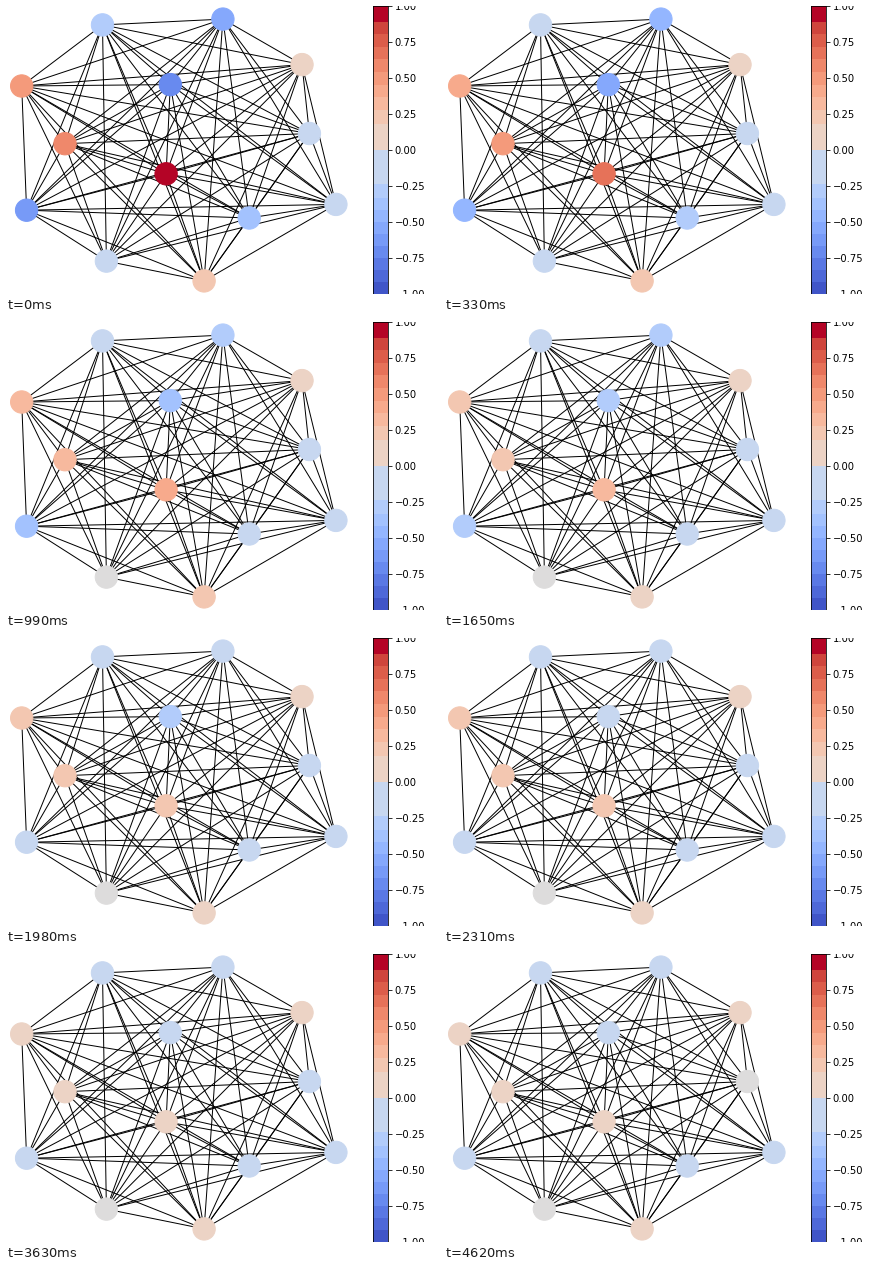
A matplotlib script for the animation above (4.95 s loop, 432 px wide and 288 px high).

```python
from itertools import combinations

import matplotlib.pyplot as plt
import numpy as np
from matplotlib.animation import FuncAnimation
from matplotlib.collections import LineCollection

W, H = 432, 288
STEPS, STEP_MS = 15, 330
DECAY = .45

# x, y and starting value of each node
NODES = np.array([
    (96.5, 18.9, -.25), (216.9, 13.1, -.55), (296, 58.6, .15),
    (15.7, 80, .51), (164.3, 78.6, -.71), (59, 137.7, .62),
    (303.4, 127.5, -.12), (160.1, 167.8, 1), (20.6, 204.2, -.64),
    (243.2, 212, -.34), (329.9, 198.4, -.2), (100.4, 255.1, -.075),
    (198.1, 274.9, .26),
])
points, start = NODES[:, :2], NODES[:, 2]

# colour bands: grey in the middle, wide pale bands, then even steps
cold = np.r_[-np.linspace(1, 1 / 3, 9), -.235]
warm = np.r_[.18, np.linspace(.28, .89, 8), 1]
edges = np.r_[cold, -.07, .07, warm]
mids = (edges[:-1] + edges[1:]) / 2
mids[-1] = 1
bands = plt.get_cmap("coolwarm")((mids + 1) / 2)
grey = len(cold)


def tones(values):
    return bands[np.digitize(values, edges[1:-1])]


def values_at(step):
    """Each value fades at a rate proportional to its square."""
    return start / (1 + DECAY * np.abs(start) * step)


fig = plt.figure(figsize=(W / 72, H / 72), dpi=72, facecolor="white")

# network: every node is linked to every other
ax = fig.add_axes([0, 0, 1, 1])
ax.set_xlim(0, W)
ax.set_ylim(H, 0)
ax.axis("off")
ax.add_collection(LineCollection(list(combinations(points, 2)),
                                 colors="black", linewidths=1, zorder=1))
dots = ax.scatter(*points.T, s=500, linewidths=1, zorder=2)

# colour scale, where the pale bands meet at zero
bar = fig.add_axes([.85, 0, 14.4 / W, 1])
bar_edges = np.r_[cold, 0, warm]
bar.bar(.5, np.diff(bar_edges), width=1, bottom=bar_edges[:-1],
        color=np.delete(bands, grey, axis=0), linewidth=0)
bar.set_xlim(0, 1)
bar.set_ylim(-1, 1)
bar.set_xticks([])
bar.yaxis.tick_right()
bar.set_yticks(np.linspace(-1, 1, 9))
bar.yaxis.set_major_formatter("{x:.2f}")
bar.tick_params(labelsize=10, length=3.5, width=.8, pad=3.5)
for label in bar.get_yticklabels():
    label.set_family("DejaVu Sans")


def draw(step):
    colors = tones(values_at(step))
    dots.set_facecolor(colors)
    dots.set_edgecolor(colors)
    return [dots]


anim = FuncAnimation(fig, draw, frames=STEPS, interval=STEP_MS,
                     repeat=True, repeat_delay=0, blit=False)
plt.show()
```
